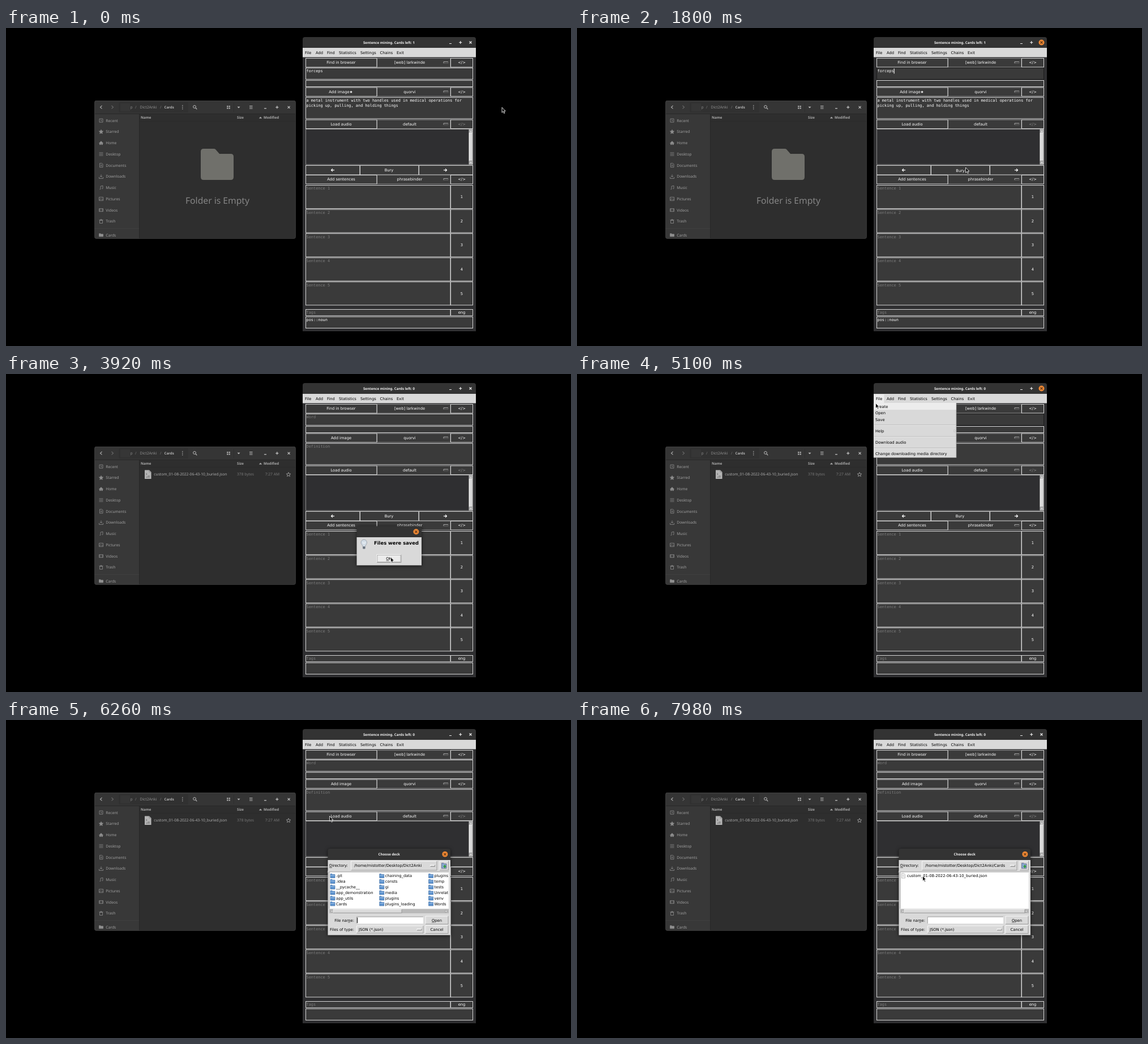
An HTML page for the animation above (8 s loop, 998 by 561 pixels).

```html
<!DOCTYPE html>
<html lang="en">
<head>
<meta charset="utf-8">
<title>Sentence mining</title>
<style>
html, body { margin: 0; width: 100%; height: 100%; overflow: hidden; background: #000; }
svg { display: block; width: 998px; height: 561px; }
text { white-space: pre; text-rendering: geometricPrecision; font: 6.76px "DejaVu Sans", sans-serif; }
.mono { font: 6.91px "DejaVu Sans Mono", monospace; }
.ui { font: 6.7px "Noto Sans", sans-serif; }
.bold { font: 700 6.15px "Noto Sans", sans-serif; }
.head { font: 700 8.4px "DejaVu Sans", sans-serif; }
.large { font: 300 15.7px "Noto Sans", sans-serif; }
.dialog { filter: drop-shadow(0 1px 3px rgba(0,0,0,.6)); transform-box: fill-box; transform-origin: center; }
</style>
</head>
<body>
<svg id="stage" viewBox="0 0 998 561"></svg>
<script>
const DURATION = 8000;
const LINE = '#d6d6d6', THIN_LINE = '#8b8b8b', DARK = '#2f2f31', WIDGET = '#3a3a3a';
const FACE = '#d9d9d9', HOVER = '#ececec', HINT = '#7c7c7c';

const escape = s => s.replace(/&/g, '&amp;').replace(/</g, '&lt;');
const label = (x, y, s, fill = '#fff', cls = '', anchor = 'start') =>
  `<text x="${x}" y="${y}" fill="${fill}" class="${cls}" text-anchor="${anchor}">${escape(s)}</text>`;
const centered = (x, y, s, fill, cls) => label(x, y, s, fill, cls, 'middle');
const rect = (x1, y1, x2, y2, fill, extra = '') =>
  `<rect x="${x1}" y="${y1}" width="${x2 - x1}" height="${y2 - y1}" fill="${fill}" ${extra}/>`;
const box = (x1, y1, x2, y2, fill = WIDGET, line = LINE) =>
  rect(x1 + .5, y1 + .5, x2 - .5, y2 - .5, fill, `stroke="${line}"`);
const path = (d, stroke, width = 1, fill = 'none') =>
  `<path d="${d}" stroke="${stroke}" stroke-width="${width}" fill="${fill}"/>`;
const group = (id, body, cls = '') => `<g id="${id}" class="${cls}">${body}</g>`;
const bevel = (x1, y1, x2, y2, fill = FACE, light = '#fff', shade = '#8e8e8e') =>
  rect(x1, y1, x2, y2, fill) +
  path(`M${x1} ${y2}V${y1}H${x2}`, light, .8) + path(`M${x2} ${y1}V${y2}H${x1}`, shade, .8);
const cross = (x, y, color) => path(`M${x - 2} ${y - 2}l4 4m0 -4l-4 4`, color, 1.1);
const closeDot = (x, y) => `<circle cx="${x}" cy="${y}" r="5" fill="#ed8733"/>` + cross(x, y, '#5b3516');
const windowButtons = (x, y, pitch, color) =>
  path(`M${x - 2} ${y + 2}h4M${x + pitch - 2.5} ${y}h5m-2.5 -2.5v5`, color, 1.2) + cross(x + 2 * pitch, y, color);

// File manager
function fileManager() {
  const gray = '#8f8f8f';
  const places = [
    ['Recent', 'M1 1h6v6h-6zM4 2.5v2h1.5'],
    ['Starred', 'M4 .5l1 2.4 2.6.2-2 1.7.6 2.6-2.2-1.4-2.2 1.4.6-2.6-2-1.7 2.6-.2z', 1],
    ['Home', 'M.5 4.5l3.5-3.5 3.5 3.5h-1v2.5h-1.7v-2h-1.6v2h-1.7v-2.5z', 1],
    ['Desktop', 'M.5 1.5h7M.5 4h7M.5 6.5h7'],
    ['Documents', 'M1.5 .5h4l1.5 1.5v5.5h-5.5zM3 3.5h2.5M3 5h2.5'],
    ['Downloads', 'M4 .5v4.5m-2 -2l2 2 2 -2M.5 5v2.5h7v-2.5'],
    ['Music', 'M3 6.5v-5l4-1v5M1.5 6.7h1.5M5.5 5.7h1.5'],
    ['Pictures', 'M.5 1h7v6h-7zM1 6l2-2.5 1.5 1.5 1-1 2 2'],
    ['Videos', 'M.5 1.5h7v5h-7zM2 1.5v5M6 1.5v5'],
    ['Trash', 'M1.5 2.5h5v5h-5zM.5 1.7h7M3 .7h2'],
    ['Cards', 'M.5 1.5h2.5l1 1h3.5v4h-7z', 1]
  ];
  const sidebar = places.map(([name, icon, solid], i) => {
    const y = i < 10 ? 163.2 + 19.75 * i : 365.3;
    return `<g transform="translate(164 ${y - 4})">${path(icon, gray, .8, solid ? gray : 'none')}</g>` +
      label(176.3, y + 2.4, name, '#a0a0a0', 'ui');
  }).join('');
  return `<g clip-path="url(#filesClip)">` +
    rect(156, 128, 512, 372, '#2e2e2e') + rect(156, 151, 235.5, 372, '#383838') +
    rect(156, 128, 512, 151.5, '#353535') + rect(199, 131, 322, 149, '#313131', 'rx="2"') +
    rect(202, 133, 219, 147, '#363636') +
    path('M156 151.5H512M235.5 151.5V372', '#272727') + path('M156 353.5H235', '#434343', .7) + sidebar +
    path('M169.5 137l-3 2.7 3 2.7', '#b0b0b0', 1.1) + path('M186.5 137l3 2.7 -3 2.7', '#6b6b6b', 1.1) +
    label(219.5, 142, 'p', '#858585', 'ui') + label(228, 142, '/', '#777', 'ui') +
    label(236.5, 142, 'Dict2Anki', '#8f8f8f', 'ui') + label(272, 142, '/', '#777', 'ui') +
    label(279.5, 142, 'Cards', '#b4b4b4', 'bold') +
    [136.8, 139.8, 142.8].map(y => `<circle cx="311.8" cy="${y}" r=".8" fill="#bbb"/>`).join('') +
    `<circle cx="333" cy="139" r="2.4" fill="none" stroke="#bbb"/>` + path('M335 141l2.3 2.3', '#bbb', 1.2) +
    rect(390.2, 137.2, 392.4, 139.3, '#bbb') + rect(393.6, 137.2, 395.8, 139.3, '#bbb') +
    rect(390.2, 140.5, 392.4, 142.6, '#bbb') + rect(393.6, 140.5, 395.8, 142.6, '#bbb') +
    path('M408.5 138.8h5l-2.5 2.6z', 'none', 0, '#bbb') + path('M402.5 132v16', '#2d2d2d', .7) +
    path('M430 137.5h5.5M430 139.8h5.5M430 142.1h5.5', '#bbb', .9) + windowButtons(458, 139.8, 20.8, '#c5c5c5') +
    label(238, 160.3, 'Name', '#aaa', 'bold') + label(408, 160.3, 'Size', '#aaa', 'bold') +
    label(455, 160.3, 'Modified', '#aaa', 'bold') + path('M446.8 159.6h5.4l-2.7 -3z', 'none', 0, '#aaa') +
    path('M236 164.5H512', '#292929', .7) +
    group('emptyFolder',
      path('M344 218q0-5 5-5h18q2 0 3 1l7 8h20q5 0 5 5v36q0 5-5 5h-48q-5 0-5-5z', 'none', 0, '#70706b') +
      centered(373.5, 310, 'Folder is Empty', '#858585', 'large')) +
    group('savedFile',
      path('M245 169.5h8l3.5 3.5v12h-11.5z', 'none', 0, '#b5b5b5') +
      path('M253 169.5v3.5h3.5', '#777', .7) + path('M247 175l2.2 1.6-2.2 1.6M250 180h4M247 182h7', '#555', .7) +
      label(261.3, 179.2, 'custom_01-08-2022-06-43-10_buried.json', '#adadad', 'ui') +
      label(408, 179.2, '378 bytes', '#777', 'ui') + label(483, 179.2, '7:27 AM', '#777', 'ui', 'end') +
      path('M499 173.5l1 2.5 2.8.2-2.1 1.7.7 2.7-2.4-1.5-2.4 1.5.7-2.7-2.1-1.7 2.8-.2z', '#aaa', .8)) +
    '</g>' + rect(156.5, 128.5, 511.5, 371.5, 'none', 'rx="3" stroke="#424242" stroke-width=".7"');
}

// Card editor
const indicator = (x, y, light, shade) => bevel(x, y - 1.2, x + 8, y + 1.5, 'none', light, shade);

function toolRow(y, action, choice, codeColor = '#fff') {
  const base = y + 10.3;
  return box(655, y, 785.5, y + 16.5, WIDGET, THIN_LINE) +
    box(529, y, 655.5, y + 16.5) + box(785, y, 825, y + 16.5) +
    (action ? centered(592, base, action) : '') + centered(713, base, choice) +
    indicator(773, y + 7.8, '#c8c8c8', '#6a6a6a') + centered(805, base, '</>', codeColor);
}

function editor() {
  const menus = [['File', 528], ['Add', 547], ['Find', 567], ['Statistics', 588],
    ['Settings', 626], ['Chains', 660.5], ['Exit', 690]];
  let out = rect(524, 16, 830, 45, '#333', 'rx="4"') + rect(524, 35, 830, 535, DARK) +
    rect(524, 35, 830, 51.5, FACE) +
    group('titleBefore', centered(676.5, 27.7, 'Sentence mining. Cards left: 1', '#f2f2f2', 'bold')) +
    group('titleAfter', centered(676.5, 27.7, 'Sentence mining. Cards left: 0', '#f2f2f2', 'bold')) +
    windowButtons(785, 25.5, 17.75, '#eee') + group('focusDot', closeDot(820.5, 25.5)) +
    group('fileActive', rect(524.5, 36, 542.5, 51, HOVER)) +
    menus.map(([name, x]) => label(x, 45.6, name, '#000')).join('') +
    toolRow(53, 'Find in browser', '[web] larkwinde') +
    box(529, 70, 825, 91) + group('wordFocus', box(529, 70, 825, 91, WIDGET, '#1c1c1c')) + box(529, 92, 825, 104) +
    toolRow(104.5, '', 'quorvi') + box(529, 122, 825, 160.5) +
    toolRow(161.5, 'Load audio', 'default', '#8a8a8a') + box(529, 178, 825, 241.5, DARK, THIN_LINE) +
    rect(817.5, 178.5, 824.5, 241, '#b9b9b9') + bevel(818.3, 185, 824, 234.5, FACE) +
    path('M818.5 184h5l-2.5 -4.5z', '#888', .5, FACE) + path('M818.5 235.7h5l-2.5 4.5z', '#888', .5, FACE) +
    box(529, 242, 625.5, 259.5) + box(625, 242, 729.5, 259.5) + box(729, 242, 825, 259.5) +
    path('M580 250.7h-5.5m2.5 -2.5l-2.5 2.5 2.5 2.5M773 250.7h5.5m-2.5 -2.5l2.5 2.5 -2.5 2.5', '#fff', 1.2) +
    group('bury', centered(676.5, 253, 'Bury')) +
    toolRow(259, 'Add sentences', 'phrasebinder');
  for (let i = 0; i < 5; i++) {
    const y = 277 + 42.6 * i;
    out += box(529, y, 785.5, y + 42) + box(785, y, 825, y + 42) +
      label(530.5, y + 8.3, 'Sentence ' + (i + 1), HINT, 'mono') + centered(805, y + 23.2, String(i + 1));
  }
  return out + box(529, 496, 785.5, 508) + label(530.5, 504.4, 'Tags', HINT, 'mono') +
    box(785, 496, 825, 508) + centered(805, 504.4, 'eng') + box(529, 509, 825, 530) +
    group('cardData',
      label(530.5, 78.4, 'forceps', '#fff', 'mono') + centered(591.5, 115, 'Add image★') +
      label(530.5, 130.2, 'a metal instrument with two handles used in medical operations for', '#fff', 'mono') +
      label(530.5, 138.7, 'picking up, pulling, and holding things', '#fff', 'mono') +
      label(530.5, 517.4, 'pos::noun', '#fff', 'mono')) +
    group('blankCard', centered(592, 115, 'Add image') + label(530.5, 130.2, 'Definition', HINT, 'mono')) +
    group('wordHint', label(530.5, 78.4, 'Word', HINT, 'mono')) +
    group('caretEnd', rect(559.6, 71.5, 560.7, 80.5, '#fff')) +
    group('caretStart', rect(530.3, 71.5, 531.4, 80.5, '#fff'));
}

function fileMenu() {
  const items = [['Create', 59.6], ['Open', 71.2], ['Save', 82.6], ['Help', 102.7],
    ['Download audio', 123], ['Change downloading media directory', 143.4]];
  return bevel(524.4, 51.5, 670, 147.5) + group('hoverCreate', rect(525, 52, 669.5, 63, HOVER)) +
    group('hoverOpen', rect(525, 63.3, 669.5, 74.5, HOVER)) +
    [90, 110.3, 130.5].map(y => path(`M525 ${y}H669.5`, '#8e8e8e', .6) + path(`M525 ${y + .7}H669.5`, '#fff', .6)).join('') +
    path('M666 98.3l3 2-3 2z', '#999', .4, '#eee') + items.map(([s, y]) => label(527, y, s, '#000')).join('');
}

// Dialogs
const titleBar = (x1, y, x2, title) =>
  rect(x1, y, x2, y + 30, '#333', 'rx="4"') + closeDot(x2 - 9.6, y + 9.8) +
  (title ? centered((x1 + x2) / 2, y + 12, title, '#f2f2f2', 'bold') : '');

function savedDialog() {
  return titleBar(619.5, 268.5, 734) + rect(619.5, 288, 734, 337.5, FACE) +
    path('M627 298a5.3 5.3 0 1 1 9.5 2.6q-1.8 2-1.8 4h-4.6q0-2-1.8-4q-1.3-1.2-1.3-2.6z', '#8b939c', .7, '#d3dde6') +
    path('M630 297l2.4 2 2.4-2', '#fff', 1) + rect(630.2, 304.5, 634.6, 308.5, '#68717c', 'rx="1"') +
    label(650, 300.5, 'Files were saved', '#000', 'head') + bevel(655, 318.5, 698, 332.5) +
    group('okHover', rect(655.5, 319, 697.5, 332, HOVER)) +
    rect(656, 319.5, 697, 331.5, 'none', 'stroke="#333" stroke-width=".6" stroke-dasharray="1 1"') +
    centered(676, 328, 'OK', '#000') + path('M671.5 329.3h5', '#000', .6);
}

const folder = (x, y) => path(`M${x} ${y - 3.5}h3l1 1h4v6h-8z`, '#2f5f95', .6, '#5d93cf') +
  path(`M${x + .5} ${y - .9}h7`, '#b9d5f1', .8);

function deckDialog(right, directory, content, thumbEnd) {
  const entryEnd = right - 48, mid = right - 24;
  return titleBar(568.5, 227, right, 'Choose deck') + rect(568.5, 247, right, 379.5, FACE) +
    label(571, 259.3, 'Directory:', '#000') + path('M571 260.5h5', '#000', .6) +
    bevel(609.5, 249, right - 24, 265) + label(615, 259.3, directory, '#000') +
    indicator(right - 35.5, 257, '#fff', '#777') +
    bevel(right - 19, 249, right - 3.5, 265) + path(`M${right - 15.5} 252.5h3.5l1 1.3h4v8h-8.5z`, '#447', .6, '#86a8cc') +
    path(`M${right - 10} 261.5v-4.5m-2.2 2l2.2 -2.3 2.2 2.3`, '#2f9c2f', 1.5) +
    bevel(571, 268, right - 3, 333, '#fff', '#8e8e8e', '#eee') + content +
    rect(571, 333.5, right - 3, 341, '#b9b9b9') + bevel(578, 334.2, thumbEnd, 340.4) +
    path('M577 335v4.8l-4.5 -2.4z', '#888', .5, FACE) + path(`M${right - 9} 335v4.8l4.5 -2.4z`, '#888', .5, FACE) +
    label(615, 355.6, 'File name:', '#000', '', 'end') + path('M604 357h4', '#000', .5) +
    bevel(619.3, 347.3, entryEnd, 359.2, '#fff', '#8e8e8e', '#eee') +
    bevel(entryEnd + 4, 346, right - 4, 360) + centered(mid, 355.6, 'Open', '#000') + path(`M${mid - 9} 357h5`, '#000', .5) +
    label(615, 371.8, 'Files of type:', '#000', '', 'end') + bevel(619.3, 363, entryEnd, 376) +
    label(623, 371.8, 'JSON (*.json)', '#000') + indicator(entryEnd - 11, 369.5, '#fff', '#777') +
    bevel(entryEnd + 4, 362.5, right - 4, 376.5) + centered(mid, 371.8, 'Cancel', '#000');
}

function folderList() {
  const columns = [
    ['.git', '.idea', '__pycache__', 'app_demonstration', 'app_utils', 'Cards'],
    ['chaining_data', 'consts', 'gi', 'media', 'plugins', 'plugins_loading'],
    ['plugins', 'temp', 'tests', 'Unrelated', 'venv', 'Words']
  ];
  return group('cardsSelected', rect(582.5, 319.3, 604, 329, '#c3c3c3')) + '<g clip-path="url(#listClip)">' +
    columns.map((names, c) => names.map((name, r) => {
      const x = 573 + 86.8 * c, y = 275 + 9.86 * r;
      return folder(x, y) + label(x + 10, y + 2.3, name, '#000');
    }).join('')).join('') + '</g>';
}

const savedEntry = path('M573.5 270.5h4l2 2v6.5h-6z', '#aaa', .7, '#f2f2f2') + path('M575 273.5h2.5M575 275.5h3', '#aaa', .5) +
  label(583, 277.3, 'custom_01-08-2022-06-43-10_buried.json', '#000');

const stage = document.getElementById('stage');
stage.innerHTML =
  `<defs><clipPath id="filesClip">${rect(156.5, 128, 511.5, 371.5, '#fff', 'rx="3"')}</clipPath>` +
  `<clipPath id="listClip">${rect(571, 268, 781, 333, '#fff')}</clipPath></defs>` +
  fileManager() + editor() + group('menu', fileMenu()) + group('saved', savedDialog(), 'dialog') +
  group('chooser', deckDialog(785, '/home/mistotter/Desktop/Dict2Anki', folderList(), 699) +
    group('entryCaret', rect(620.2, 348.5, 621.2, 358.3, '#000')), 'dialog') +
  group('chooserCards', deckDialog(801, '/home/mistotter/Desktop/Dict2Anki/Cards', savedEntry, 791), 'dialog') +
  group('pointer', path('M0 0V9.2L2.1 7.2 3.6 10.6 5.1 9.9 3.6 6.6H6.3Z', '#fff', .8, '#111'));

const nodes = {};
for (const g of stage.querySelectorAll('g[id]')) nodes[g.id] = g;

// Time, x, y of the pointer tip
const route = [
  [0, 876, 140], [560, 876, 140], [1360, 692, 239], [1600, 686.5, 246], [2820, 686.5, 246],
  [3400, 682, 315], [3680, 679.5, 323], [4060, 679.5, 323], [4680, 526.5, 45.5], [4700, 526, 44.5],
  [4880, 526, 44.5], [5100, 527.5, 51.3], [5480, 533, 67], [5860, 533, 67], [6260, 571.5, 169.5],
  [6500, 588, 289], [6820, 591, 319.5], [7400, 591, 319.5], [7980, 610.5, 275]
];
const smooth = k => k * k * (3 - 2 * k);
const clamp = k => Math.max(0, Math.min(1, k));

function pointerAt(t) {
  const i = route.findIndex(p => p[0] > t);
  if (i < 0) return route[route.length - 1].slice(1);
  const [t0, x0, y0] = route[i - 1], [t1, x1, y1] = route[i];
  let k = (t - t0) / (t1 - t0);
  if (t0 < 5860 || t0 > 6800) k = smooth(k);
  return [x0 + (x1 - x0) * k, y0 + (y1 - y0) * k];
}

const show = (id, on) => { nodes[id].style.visibility = on ? 'inherit' : 'hidden'; };
const blink = (t, start) => t >= start && (t - start) % 900 < 600;

function popup(id, t, start, end, openMs = 120, closeMs = 100) {
  const on = t >= start && t < end + closeMs;
  const k = openMs ? clamp((t - start) / openMs) : 1;
  const amount = t < end ? 1 - (1 - k) * (1 - k) : 1 - clamp((t - end) / (closeMs || 1));
  nodes[id].style.visibility = on ? 'visible' : 'hidden';
  nodes[id].style.opacity = amount;
  nodes[id].style.transform = `scaleY(${amount})`;
}

function render(now) {
  const t = Math.floor(now % DURATION / 20) * 20;
  const [x, y] = pointerAt(t);
  const between = (a, b) => t >= a && t < b;
  const cleared = t >= 1840, menuOpen = between(4840, 5700);
  const focused = between(1800, 2640) || between(4040, 5860);

  nodes.pointer.setAttribute('transform', `translate(${x} ${y})`);
  show('emptyFolder', t < 2640);
  show('savedFile', t >= 2640);
  show('titleBefore', !cleared);
  show('titleAfter', cleared);
  show('cardData', !cleared);
  show('blankCard', cleared);
  show('wordHint', cleared && !focused);
  show('wordFocus', focused);
  show('focusDot', focused);
  show('caretEnd', between(1800, 1840));
  show('caretStart', cleared && focused && blink(t, t < 4000 ? 1820 : 4040));
  nodes.bury.setAttribute('transform', between(1800, 1840) ? 'translate(.6 .6)' : '');

  show('menu', menuOpen);
  show('fileActive', menuOpen);
  show('hoverCreate', menuOpen && y > 51 && y < 63);
  show('hoverOpen', menuOpen && y >= 63);

  popup('saved', t, 2640, 4020);
  show('okHover', between(3420, 4120));
  popup('chooser', t, 5860, 7280, 120, 0);
  popup('chooserCards', t, 7280, DURATION, 0, 0);
  show('entryCaret', t < 7040 && blink(t, 5860));
  show('cardsSelected', t >= 7040);
}

function tick() {
  render(performance.now());
  requestAnimationFrame(tick);
}
tick();
</script>
</body>
</html>
```
